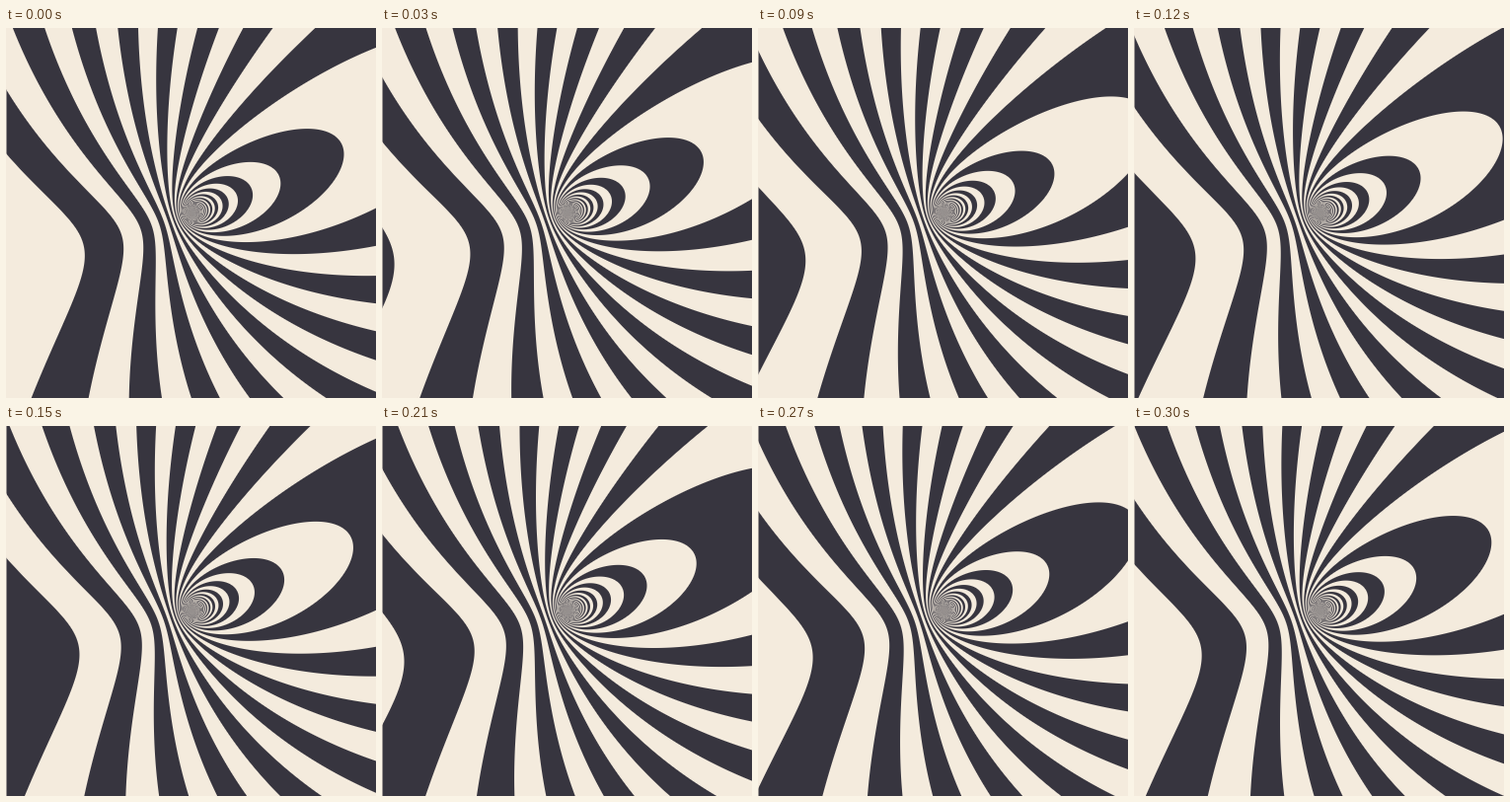
An HTML page with a canvas that plays this animation: 375 px wide and 375 px high, repeating every 330 ms.

```html
<!DOCTYPE html>
<html lang="en">
<head>
<meta charset="utf-8">
<title>Striped vortex</title>
<style>
  html, body { margin: 0; width: 100%; height: 100%; overflow: hidden; background: #f4ebdd; }
  canvas { display: block; width: 375px; height: 375px; }
</style>
</head>
<body>
<canvas width="375" height="375"></canvas>
<script>
const SIZE = 375, STEPS = 11, STEP_MS = 30;
const CX = 188.2, CY = 187.3;
const DARK = [55, 53, 63], LIGHT = [244, 235, 221];
const ctx = document.querySelector('canvas').getContext('2d');

// Stripe coordinate: every whole number is an edge between two stripes.
// A smooth quadratic surface divided by the distance from the centre.
function stripe(x, y) {
  const dx = x - CX, dy = CY - y;
  const r = Math.max(Math.hypot(dx, dy), 0.3);
  const tilt = -7.8 * dx - 2.85 * dy;
  const bowl = 0.00526 * r * r - 0.0006 * (dx * dx - dy * dy) - 0.0071 * dx * dy;
  return 9.05 + (tilt + bowl - 190) / r;
}

const field = new Float32Array(SIZE * SIZE);
const slope = new Float32Array(SIZE * SIZE);
for (let y = 0, i = 0; y < SIZE; y++) {
  for (let x = 0; x < SIZE; x++, i++) {
    const px = x + 0.5, py = y + 0.5;
    field[i] = stripe(px, py);
    const gx = stripe(px + 0.5, py) - stripe(px - 0.5, py);
    const gy = stripe(px, py + 0.5) - stripe(px, py - 0.5);
    slope[i] = Math.PI * Math.hypot(gx, gy);
  }
}

function render(step) {
  const image = ctx.createImageData(SIZE, SIZE);
  const shift = 2 * step / STEPS;
  for (let i = 0; i < field.length; i++) {
    const wave = Math.sin(Math.PI * (field[i] + shift));
    let light = Math.min(1, Math.max(0, 0.5 + wave / slope[i]));
    if (i % SIZE === 0) light = (light + 1) / 2; // soft left border
    for (let k = 0; k < 3; k++) {
      image.data[i * 4 + k] = DARK[k] + (LIGHT[k] - DARK[k]) * light;
    }
    image.data[i * 4 + 3] = 255;
  }
  return image;
}

const frames = Array.from({ length: STEPS }, (_, step) => render(step));
const start = performance.now();
let shown = -1;

function draw() {
  const step = Math.floor((performance.now() - start) / STEP_MS) % STEPS;
  if (step !== shown) ctx.putImageData(frames[shown = step], 0, 0);
  requestAnimationFrame(draw);
}
draw();
</script>
</body>
</html>
```
